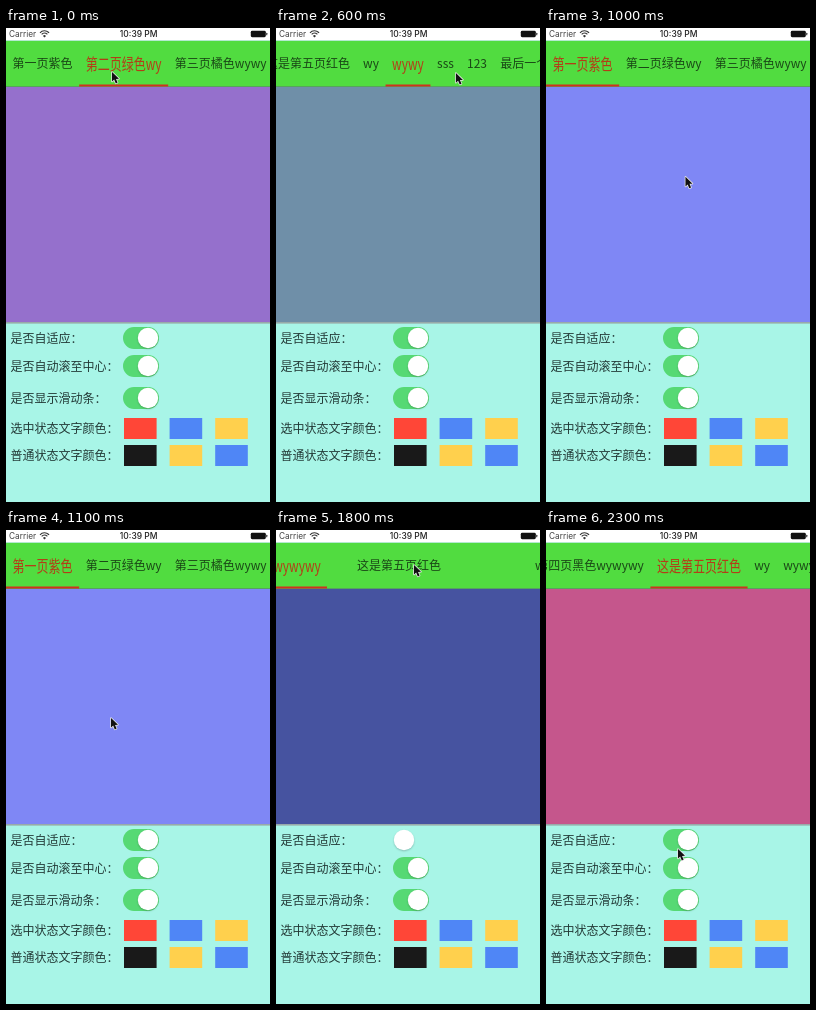
These frames come from a looping animation (264 px wide and 474 px high, 2400 ms). An HTML page with a canvas:

```html
<!DOCTYPE html>
<html lang="zh">
<head>
<meta charset="utf-8">
<style>
html, body { margin: 0; width: 264px; height: 474px; overflow: hidden; background: #fff; }
canvas { display: block; width: 264px; height: 474px; }
</style>
</head>
<body>
<canvas id="stage"></canvas>
<script>
const W = 264, H = 474, LOOP = 2400, STEP = 100;
const canvas = document.getElementById('stage');
const ctx = canvas.getContext('2d');
const dpr = window.devicePixelRatio || 1;
canvas.width = W * dpr;
canvas.height = H * dpr;

const CJK = '300 12px "Noto Sans CJK SC", "Noto Sans CJK", "Noto Sans", sans-serif';
const UI = 'Inter, Roboto, sans-serif';
const PAD = 13.15, WIDE = 144;

// title and page colour
const tabs = [
  ['第一页紫色', '#7f87f5'],
  ['第二页绿色wy', '#9570cc'],
  ['第三页橘色wywy', '#8a7f98'],
  ['这是第四页黑色wywywy', '#4653a0'],
  ['这是第五页红色', '#c5568c'],
  ['wy', '#8c8a78'],
  ['wywy', '#6f8fa8'],
  ['sss', '#9a7890'],
  ['123', '#bd6071'],
  ['最后一个', '#58b4a0']
];

// moments of the pointer: step, x, y, strip drag, part of the page slide left
const moments = [
  [0, 106, 44, 0, 0],
  [3, 73, 60, 270, 0],
  [8, 238, 37, 0, 0.984],
  [11, 105, 188, 0, 0],
  [14, 126, 24, 60, 0],
  [18, 138, 35, 153, 0],
  [23, 132, 319, -21, 0]
];

const mix = (a, b, k) => a + (b - a) * k;
const clamp = (v, lo, hi) => Math.min(hi, Math.max(lo, v));
const smooth = k => k * k * (3 - 2 * k);

// The first run speeds through all tabs, the second steps evenly to the fifth.
const selected = step => step < 10
  ? Math.min(9, 1 + Math.ceil(step * step / 8))
  : clamp(1 + Math.floor((step - 14) / 2), 0, 4);

function layout(fit) {
  ctx.font = CJK;
  let x = 0;
  return tabs.map(([title]) => {
    const w = fit ? ctx.measureText(title).width + PAD : WIDE;
    x += w;
    return { x: x - w, w };
  });
}

function poseAt(step) {
  const fit = step < 13 || step > 21;
  const spans = layout(fit), sel = selected(step);
  const tab = spans[sel], last = spans[spans.length - 1];
  let off = clamp(tab.x + tab.w / 2 - W / 2, 0, last.x + last.w - W);
  let left = 0;
  for (const [at, , , drag, slide] of moments) {
    off += drag * Math.max(0, 1 - Math.abs(step - at) / 1.5);
    if (at === step) left = slide;
  }
  const i = Math.max(0, moments.findIndex(m => m[0] >= step) - 1);
  const a = moments[i], b = moments[i + 1];
  const k = smooth((step - a[0]) / (b[0] - a[0]));
  return {
    fit, spans, sel, off,
    page: sel - left, bar: sel - left * 0.92,
    x: mix(a[1], b[1], k), y: mix(a[2], b[2], k)
  };
}

function rect(x, y, w, h, color) {
  ctx.fillStyle = color;
  ctx.fillRect(x, y, w, h);
}

function pill(x, y, w, h, r, color) {
  ctx.fillStyle = color;
  ctx.beginPath();
  ctx.roundRect(x, y, w, h, r);
  ctx.fill();
}

function text(str, x, y, font, color, align = 'left') {
  ctx.font = font;
  ctx.fillStyle = color;
  ctx.textAlign = align;
  ctx.fillText(str, x, y);
}

function statusBar() {
  rect(0, 0, W, 12, '#fff');
  rect(0, 12, W, 1, '#b4ead0');
  text('Carrier', 3, 9, `400 8.3px ${UI}`, '#444');
  text('10:39 PM', 132.7, 9, `500 8.5px ${UI}`, '#222', 'center');
  ctx.strokeStyle = ctx.fillStyle = '#333';
  ctx.lineWidth = 1.1;
  for (const r of [6.2, 3.9]) {
    ctx.beginPath();
    ctx.arc(38.5, 9, r, -Math.PI * 0.76, -Math.PI * 0.24);
    ctx.stroke();
  }
  ctx.beginPath();
  ctx.moveTo(38.5, 9.4);
  ctx.arc(38.5, 9.2, 2, -Math.PI * 0.78, -Math.PI * 0.22);
  ctx.fill();
  pill(244.8, 2.8, 15, 6.4, 1.4, '#111');
  pill(260.2, 4.8, 1.1, 2.4, 0.5, '#333');
}

function header(p) {
  rect(0, 13, W, 46, '#51dc40');
  rect(0, 58, W, 1, '#56a45c');
  tabs.forEach(([title], i) => {
    const { x, w } = p.spans[i], on = i === p.sel;
    const grow = on ? 1 + 0.35 * (1 - Math.abs(p.page - i)) : 1;
    ctx.save();
    ctx.translate(x - p.off + w / 2, 35.5);
    ctx.scale(1, grow);
    text(title, 0, 4.5, CJK, on ? 'rgba(196,36,16,.86)' : 'rgba(10,30,10,.78)', 'center');
    ctx.restore();
  });
  const n = Math.floor(p.bar), k = p.bar - n;
  const a = p.spans[n], b = p.spans[n + 1] || a;
  rect(mix(a.x, b.x, k) - p.off, 56.5, mix(a.w, b.w, k), 2, '#cf321f');
}

function pages(p) {
  const n = Math.floor(p.page), shift = (p.page - n) * W;
  rect(0, 59, W, 236, tabs[n][1]);
  if (shift) rect(W - shift, 59, shift, 236, tabs[n + 1][1]);
}

function toggle(y, on) {
  if (on) pill(117, y - 11, 36, 22, 11, '#56d974');
  ctx.save();
  ctx.shadowColor = 'rgba(0,0,0,.22)';
  ctx.shadowBlur = 2 * dpr;
  ctx.shadowOffsetY = dpr;
  pill((on ? 142 : 128) - 10.2, y - 10.2, 20.4, 20.4, 10.2, '#fff');
  ctx.restore();
}

function settings(p) {
  rect(0, 294, W, H - 294, '#a8f5e7');
  rect(0, 294, W, 1.6, '#98aaa9');
  const label = (str, y) => text(str, 4.5, y + 4.5, CJK, 'rgba(0,10,10,.8)');
  label('是否自适应：', 310);
  label('是否自动滚至中心：', 338);
  label('是否显示滑动条：', 370);
  label('选中状态文字颜色：', 400);
  label('普通状态文字颜色：', 427);
  toggle(310, p.fit);
  toggle(338, true);
  toggle(370, true);
  const red = '#ff4637', blue = '#4f86f6', gold = '#ffd04d', black = '#191919';
  [[red, blue, gold], [black, gold, blue]].forEach((row, r) =>
    row.forEach((c, i) => rect(118 + i * 45.6, 390 + r * 27, 32.6, 21, c)));
}

function cursor(x, y) {
  ctx.save();
  ctx.translate(x, y);
  ctx.beginPath();
  [[0, 0], [0, 9.6], [2.2, 7.6], [3.8, 11.4], [5.6, 10.6], [4, 7], [7, 6.8]]
    .forEach(([px, py]) => ctx.lineTo(px, py));
  ctx.closePath();
  ctx.lineJoin = 'round';
  ctx.lineWidth = 1.5;
  ctx.strokeStyle = '#e8e8e8';
  ctx.stroke();
  ctx.fillStyle = '#111';
  ctx.fill();
  ctx.restore();
}

function draw(time) {
  const p = poseAt(Math.floor((time % LOOP) / STEP));
  ctx.setTransform(dpr, 0, 0, dpr, 0, 0);
  pages(p);
  header(p);
  statusBar();
  settings(p);
  cursor(p.x, p.y);
}

const start = performance.now();
function tick() {
  draw(performance.now() - start);
  requestAnimationFrame(tick);
}
tick();
</script>
</body>
</html>
```
